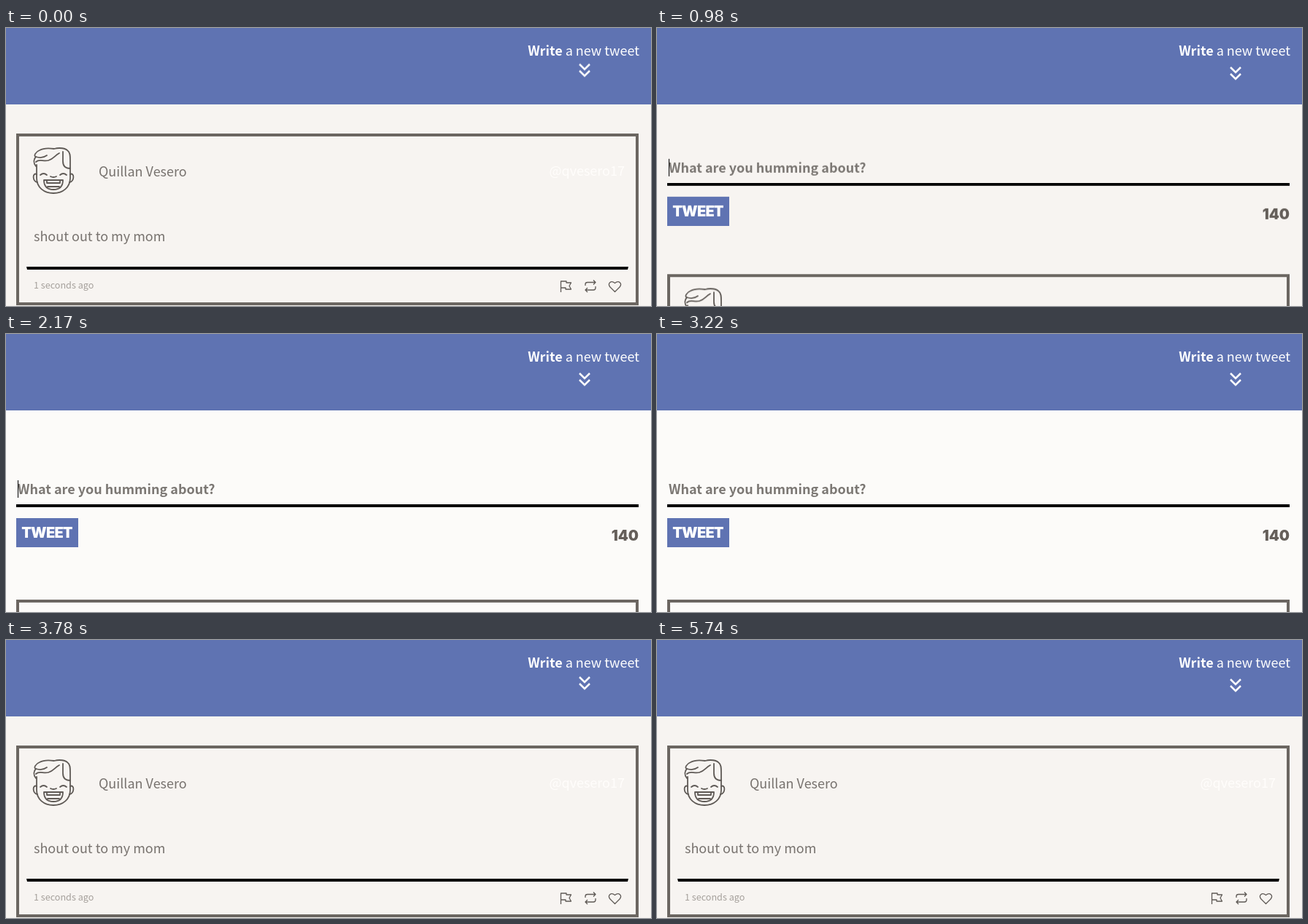
Animation, 884 px wide and 382 px high, one loop 6020 ms. Source, as an HTML page:

```html
<!DOCTYPE html>
<html lang="en">
<head>
<meta charset="utf-8">
<title>Write a new tweet</title>
<style>
  html, body { margin: 0; width: 100%; height: 100%; overflow: hidden; background: #f7f4f1; }
  svg { display: block; }

  text { font: 400 18px "Noto Sans CJK JP", "Noto Sans CJK SC", "Open Sans", sans-serif; }
  .light { font-weight: 300; fill: #77726e; }
  .end { text-anchor: end; }
  .block { font: 900 20px Inter, sans-serif; }
  .icon { fill: none; stroke: #5f5a56; stroke-width: 1.3; stroke-linejoin: round; }
  .face { stroke-width: 1.8; stroke-linecap: round; }

  .slide, .scroll, .paper, .caret, .chevrons { animation: 6020ms linear infinite; }
  .slide { animation-name: slide; }
  .card { --shut: 0px; --open: 220px; }
  .fields { --shut: -51px; --open: 0px; }
  .scroll { animation-name: scroll; }
  .paper { animation-name: paper; animation-timing-function: step-end; }
  .caret { animation-name: caret; animation-timing-function: step-end; }
  .chevrons { animation-name: bounce; }

  @keyframes slide {
    0%, 9.42%, 62.76%, 100% {
      transform: translateY(var(--shut));
      animation-timing-function: cubic-bezier(.364, 0, .636, 1);
    }
    18.31%, 53.87% {
      transform: translateY(var(--open));
      animation-timing-function: cubic-bezier(.364, 0, .636, 1);
    }
  }
  /* focusing the field scrolls the half-open form until it has room */
  @keyframes scroll {
    0%, 16.36% { transform: translateY(-15px); animation-timing-function: ease-out; }
    18.31%, 100% { transform: translateY(0); }
  }
  @keyframes paper {
    0%, 56.98%, 100% { fill: #f7f4f1; }
    18.6% { fill: #fcfbf9; }
  }
  @keyframes caret {
    0%, 32.39% { opacity: 1; }
    21.1%, 43.36%, 100% { opacity: 0; }
  }
  @keyframes bounce {
    0%, 4.98%, 22.51%, 23.84%, 43.44%, 44.77%, 64.37%, 65.7%, 85.3%, 86.63% {
      transform: translateY(-4.3px);
      animation-timing-function: ease-out;
    }
    11.63%, 18.27%, 32.56%, 39.2%, 53.49%, 60.13%, 74.42%, 81.06%, 95.35%, 100% {
      transform: translateY(0);
      animation-timing-function: ease-in-out;
    }
  }
</style>
</head>
<body>
<svg width="884" height="382" viewBox="0 0 884 382">
  <rect class="paper" width="884" height="382" fill="#f7f4f1"/>

  <g class="slide fields">
    <g class="scroll">
      <text x="16" y="220" fill="#7b7773" style="font-weight:600">What are you humming about?</text>
      <rect class="caret" x="16" y="201" width="1" height="24"/>
      <rect x="14" y="234" width="853" height="4"/>
      <rect x="14" y="253" width="85" height="40" fill="#5f73b2"/>
      <text class="block" x="56" y="280" fill="#fff" text-anchor="middle" letter-spacing="-.8">TWEET</text>
      <text class="block end" x="867" y="284" fill="#655f5a">140</text>
    </g>
  </g>

  <g class="slide card">
    <!-- hides the part of the form that is still closed -->
    <rect class="paper" y="115" width="884" height="300" fill="#f7f4f1"/>
    <rect x="16" y="147" width="849" height="232" fill="none" stroke="#6b6661" stroke-width="4"/>

    <g class="icon face">
      <path d="M42 188V206C42 219 52 227 65 227S88 219 88 206V193"/>
      <path d="M42 201C36 198 36 211 43 212M88 201C94 198 94 211 87 212"/>
      <path d="M41 190C37 185 38 180 41 177C37 176 41 170 46 168C53 164 60 165 66 166C73 164 82 165 85 169C88 171 88 176 88 182V193C81 193 78 190 78 183V170"/>
      <path d="M41 184C46 179 51 184 58 182C65 180 67 175 73 172M41 177C47 179 52 178 56 175"/>
      <path d="M47 202q4.500-4 9 0M74 202q4.500-4 9 0M61 204q4 2 8 0"/>
      <path d="M52 209H78C78 218 73 222 65 222S52 218 52 209ZM56 209V213H74V209M57 218H73"/>
    </g>
    <text class="light" x="127" y="204">Quillan Vesero</text>
    <text class="light end" x="848" y="203" style="fill:#fffdfb">@qvesero17</text>
    <text class="light" x="38" y="293">shout out to my mom</text>
    <path d="M28 328H853L852 332H29Z"/>
    <text class="light" x="38" y="358" style="font-size:12.6px;fill:#a5a09b">1 seconds ago</text>

    <g class="icon">
      <path d="M760.500 363V348H768V350H774.500L772 354.500L774.500 359H767V357H760.500"/>
      <path d="M794 354V352Q794 349.500 797 349.500H808M805 346.500L808 349.500L805 352.500M808 355V357Q808 360 805 360H794M797 357L794 360L797 363"/>
      <path d="M834.500 362.500L828 356C824 351 829 346 834.500 350.500C840 346 845 351 841 356Z"/>
    </g>
  </g>

  <rect width="884" height="105" fill="#5f73b2"/>
  <text class="end" x="868" y="38" fill="#fff"><tspan font-weight="900">Write</tspan> a new tweet</text>
  <path class="chevrons" d="M786 54L793 61L800 54M786 63L793 70L800 63" fill="none" stroke="#fff" stroke-width="2.5"/>
</svg>
</body>
</html>
```
